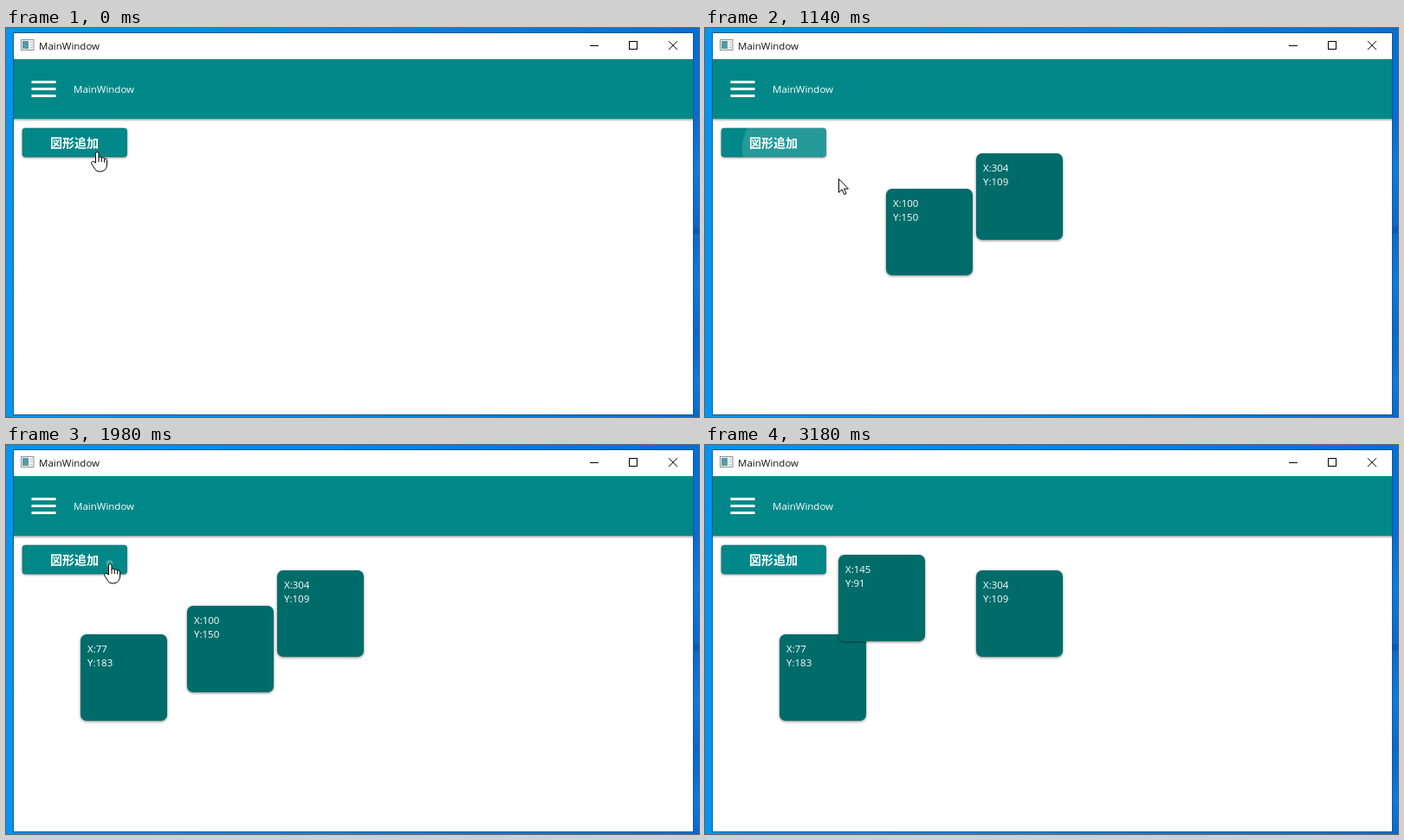
An HTML page for the animation above (3300 ms loop, 800x450 px).

```html
<!DOCTYPE html>
<html lang="ja">
<head>
<meta charset="utf-8">
<title>MainWindow</title>
<style>
  html, body { margin: 0; width: 100%; height: 100%; overflow: hidden; }
  svg { display: block; width: 800px; height: 450px; }
  text { font: 11.5px "Open Sans", "Noto Sans", sans-serif; fill: #fff; }
  .title { fill: #111; }
  .add { font: bold 14px "Noto Sans CJK JP", "Noto Sans CJK", sans-serif; text-anchor: middle; }
  .pointer { fill: #fff; stroke: #000; stroke-linejoin: round; }
</style>
</head>
<body>
<svg viewBox="0 0 800 450">
  <defs>
    <linearGradient id="sky">
      <stop offset="0" stop-color="#0295f1"/>
      <stop offset=".45" stop-color="#0088ea"/>
      <stop offset="1" stop-color="#006fd9"/>
    </linearGradient>
    <linearGradient id="pane" x2="0" y2="1">
      <stop offset="0" stop-color="#0869d4"/>
      <stop offset=".5" stop-color="#087ce8"/>
      <stop offset="1" stop-color="#0667d2"/>
    </linearGradient>
    <linearGradient id="iconFill" x2="1" y2="1">
      <stop offset="0" stop-color="#5b8fc0"/>
      <stop offset="1" stop-color="#4ba78b"/>
    </linearGradient>
    <filter id="shadow" x="-10%" y="-20%" width="120%" height="145%">
      <feDropShadow dx="0" dy="1" stdDeviation="1.4" flood-opacity=".5"/>
    </filter>
    <clipPath id="buttonClip"><rect x="19" y="116" width="120.5" height="33" rx="3"/></clipPath>
  </defs>

  <rect width="800" height="450" fill="url(#sky)"/>
  <g fill="url(#pane)">
    <rect x="793" y="97" width="7" height="133"/>
    <rect x="793" y="238" width="7" height="117"/>
    <rect x="793" y="371" width="7" height="79"/>
  </g>
  <rect x="793" y="230" width="7" height="8" fill="#0559bd"/>

  <rect x="8.5" y="5.5" width="785" height="442" fill="#fff" stroke="#17577f"/>
  <g>
    <rect x="17.5" y="13.5" width="14.5" height="12" fill="#f4f4f4" stroke="#8b9299"/>
    <rect x="19" y="15" width="7" height="9" fill="url(#iconFill)"/>
    <path d="M28 16.5h2.5M28 19.5h2.5M28 22.5h2.5" stroke="#b9bec3"/>
  </g>
  <text class="title" x="38" y="25">MainWindow</text>
  <g fill="none" stroke="#000">
    <path d="M674 20.5H684"/>
    <rect x="719.5" y="15.5" width="9" height="9"/>
    <path d="M765 15.2L775 25.2M775 15.2L765 25.2"/>
  </g>

  <svg x="9" y="36" width="784" height="75" viewBox="9 36 784 75">
    <rect x="5" y="36" width="792" height="69" fill="#008888" filter="url(#shadow)"/>
  </svg>
  <path d="M29.5 62.5h28M29.5 70.5h28M29.5 78.5h28" stroke="#fff" stroke-width="2.8"/>
  <text x="78" y="75">MainWindow</text>

  <rect x="19" y="116" width="120.5" height="33" rx="3" fill="#008888" filter="url(#shadow)"/>
  <rect x="19" y="116" width="120.5" height="33" rx="3" fill="none" stroke="#00605f" stroke-opacity=".55"/>
  <g clip-path="url(#buttonClip)"><circle id="ripple" fill="#fff"/></g>
  <text class="add" x="79" y="138">図形追加</text>

  <g id="boxes"></g>

  <g id="cursor" class="pointer">
    <path id="arrow" d="M.5 .5V16.3L4.1 12.9 6.7 18.6 9.1 17.5 6.6 12H11.4Z"/>
    <g id="hand">
      <path d="M-1.5 13V2Q-1.5 .5 .2 .5T2 2V7.5Q2 6 3.6 6T5.3 7.8Q5.4 6.8 6.8 6.8T8.6 8.6Q8.8 7.8 10 8T11.6 9.8V15Q11.6 18 9.6 20.5 7.5 23 4.5 23H2Q-.8 23-2.4 20L-6 14.5Q-7 12.5-5.5 11.7T-3 12.2Z"/>
      <path d="M2 7.5V12M5.3 7.8V12M8.6 8.6V12.5" fill="none"/>
    </g>
  </g>
</svg>

<script>
const LOOP = 3300, STEP = 20;
const HOME = { x: 209, y: 186 };
const CLIENT = { x: 9, y: 36 };

// Pointer path: [ms, x, y]
const PATH = [
  [0, 105, 143], [80, 106, 143], [240, 196, 204], [360, 246, 224], [400, 246, 224],
  [560, 350, 183], [590, 350, 183], [680, 254.5, 184.5], [860, 95, 140], [1060, 95, 140],
  [1260, 263, 238], [1300, 263, 238], [1440, 192, 258], [1580, 140, 271], [1630, 140, 271],
  [1860, 119.5, 137], [2060, 119.5, 137], [2260, 250, 256], [2290, 250, 256],
  [2440, 195, 197], [2690, 195, 197], [2780, 185, 212], [3000, 300, 330], [3180, 428, 452]
];

const ACTIONS = [
  { click: 30, grab: 400, drop: 560 },
  { click: 1010, grab: 1300, drop: 1580 },
  { click: 1970, grab: 2290, drop: 2440 }
];

const $ = id => document.getElementById(id);
const clamp = v => Math.max(0, Math.min(1, v));

function make(name, attrs, parent) {
  const node = document.createElementNS("http://www.w3.org/2000/svg", name);
  for (const key in attrs) node.setAttribute(key, attrs[key]);
  return parent.appendChild(node);
}

const boxes = ACTIONS.map(() => {
  const group = make("g", {}, $("boxes"));
  make("rect", { width: 100, height: 100, rx: 7, fill: "#006c6a", filter: "url(#shadow)" }, group);
  return {
    group,
    xText: make("text", { x: 8, y: 21 }, group),
    yText: make("text", { x: 8, y: 37 }, group)
  };
});

// Monotone tangent, so the pointer never overshoots a stop
function slope(i, axis) {
  const a = PATH[i - 1], b = PATH[i], c = PATH[i + 1];
  if (!a || !c) return 0;
  const before = (b[axis] - a[axis]) / (b[0] - a[0]);
  const after = (c[axis] - b[axis]) / (c[0] - b[0]);
  return before * after <= 0 ? 0 : 2 * before * after / (before + after);
}

function pointerAt(t) {
  let i = PATH.findIndex(key => key[0] > t) - 1;
  if (i < 0) i = PATH.length - 2;
  const a = PATH[i], b = PATH[i + 1], span = b[0] - a[0];
  const u = clamp((t - a[0]) / span), v = 1 - u;
  const along = axis =>
    v * v * (1 + 2 * u) * a[axis] + u * u * (3 - 2 * u) * b[axis] +
    span * u * v * (v * slope(i, axis) - u * slope(i + 1, axis));
  return { x: along(1), y: along(2) };
}

function drawBox(box, action, t) {
  box.group.style.display = t >= action.click ? "" : "none";
  const from = pointerAt(action.grab);
  const to = pointerAt(Math.max(action.grab, Math.min(t, action.drop)));
  const x = Math.round(HOME.x + to.x - from.x), y = Math.round(HOME.y + to.y - from.y);
  const moved = x !== HOME.x || y !== HOME.y;
  box.group.setAttribute("transform", `translate(${x} ${y})`);
  box.xText.textContent = "X:" + (moved ? x - CLIENT.x : 100);
  box.yText.textContent = "Y:" + (moved ? y - CLIENT.y : 150);
}

function drawRipple(t) {
  const action = ACTIONS.find(a => t >= a.click && t < a.click + 300);
  const u = action ? (t - action.click) / 300 : 0;
  const at = pointerAt(action ? action.click : 0);
  const ripple = $("ripple");
  ripple.setAttribute("cx", at.x);
  ripple.setAttribute("cy", at.y);
  ripple.setAttribute("r", 120 * u);
  ripple.setAttribute("opacity", action ? 0.26 * (1 - u) : 0);
}

function draw(t) {
  boxes.forEach((box, i) => drawBox(box, ACTIONS[i], t));
  drawRipple(t);
  const p = pointerAt(t);
  const overButton = p.x > 19 && p.x < 139 && p.y > 116 && p.y < 149;
  $("hand").style.display = overButton ? "" : "none";
  $("arrow").style.display = overButton ? "none" : "";
  $("cursor").style.display = t < 3180 ? "" : "none";
  $("cursor").setAttribute("transform", `translate(${Math.round(p.x)} ${Math.round(p.y)})`);
}

const start = performance.now();
function tick() {
  const t = (performance.now() - start) % LOOP;
  draw(Math.floor(t / STEP) * STEP);
  requestAnimationFrame(tick);
}
tick();
</script>
</body>
</html>
```
